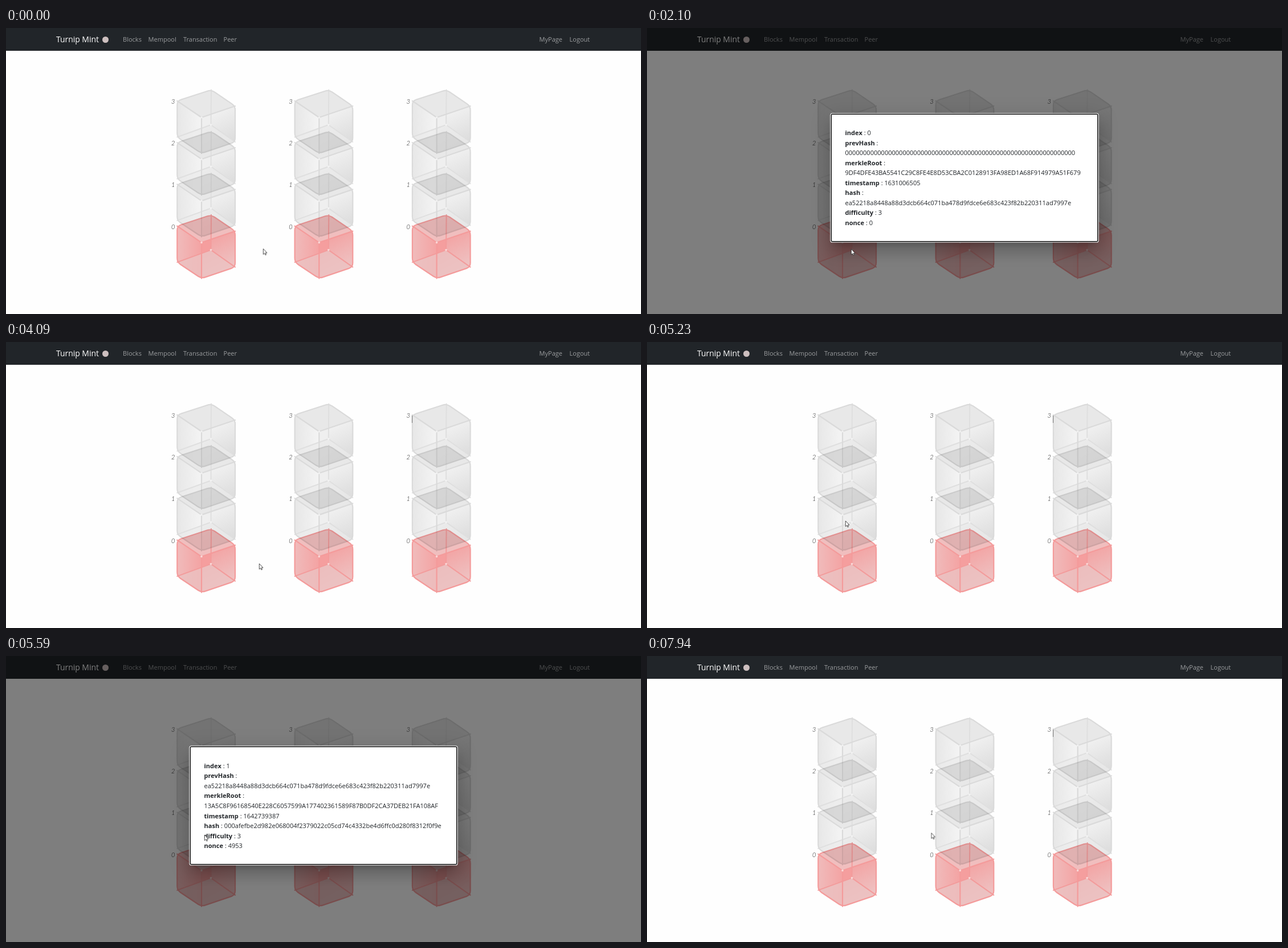
An HTML page that plays this animation: 1114x502 px, repeating every 8 s.

```html
<!DOCTYPE html>
<html lang="en">
<head>
<meta charset="utf-8">
<title>Block explorer</title>
<style>
html, body { margin: 0; width: 100%; height: 100%; overflow: hidden; background: #fefefe; }
body { font: 11.04px/17.55px "Open Sans", "Noto Sans", sans-serif; color: #212529; }
#stage { position: absolute; inset: 0 auto auto 0; width: 1114px; height: 502px; overflow: hidden; background: #fefefe; }
#stage > * { position: absolute; }

nav { left: 0; top: 0; width: 100%; height: 40px; background: #212529; color: #9b9d9f; }
nav span { position: absolute; top: 11px; white-space: nowrap; }
nav .brand { left: 88px; font-size: 13.9px; color: #fff; }
nav i { position: absolute; left: 169px; top: 14.5px; width: 11px; height: 11px; border-radius: 50%; background: #cdbfbf; }

svg { left: 0; top: 0; }
#stacks text { font: italic 300 11px Lato, "Open Sans", sans-serif; fill: #222; }

.caret { width: 1px; opacity: 0; animation: 8s step-end infinite; }
#caretA { left: 295px; top: 340px; height: 14px; background: #444; animation-name: caretA; }
#caretB { left: 712px; top: 129px; height: 13px; background: #777; animation-name: caretB; }

#dim { inset: 0; background: #000; opacity: 0; animation: dim 8s step-end infinite; }

.modal {
  left: 323px; width: 468px; box-sizing: border-box; padding: 23.5px;
  border: 1px solid #000; border-radius: 2px; background: #fff; white-space: nowrap; opacity: 0;
  box-shadow: 0 0 0 .5px #222, 0 0 0 1.6px #fff,
    0 8px 11px -5px rgba(0,0,0,.2), 0 17.5px 28px 2px rgba(0,0,0,.14), 0 6.5px 34px 6px rgba(0,0,0,.12);
  animation: 8s step-end infinite;
}
#genesis { top: 150.5px; animation-name: genesis; }
#second { top: 159.3px; animation-name: second; }

#cursor { overflow: visible; animation: cursor 8s ease-in-out infinite; }

@keyframes caretA {
  0% { opacity: 0 } .87% { opacity: 1 } 6.74% { opacity: 0 }
  13.36% { opacity: 1 } 20% { opacity: 0 }
}
@keyframes caretB {
  0% { opacity: 0 } 49.48% { opacity: 1 } 57% { opacity: 0 }
  63.6% { opacity: 1 } 67.2% { opacity: 0 } 93.23% { opacity: 1 }
  100% { opacity: 1 }
}
@keyframes dim {
  0% { opacity: 0 }
  23.6% { opacity: .03 } 24.6% { opacity: .39 } 25.48% { opacity: .49 } 26.23% { opacity: .5 }
  49.48% { opacity: 0 }
  67.23% { opacity: .17 } 68.1% { opacity: .44 } 69% { opacity: .497 } 69.85% { opacity: .5 }
  93.23% { opacity: 0 }
}
@keyframes genesis { 0% { opacity: 0 } 23.6% { opacity: 1 } 49.48% { opacity: 0 } }
@keyframes second { 0% { opacity: 0 } 67.23% { opacity: 1 } 93.23% { opacity: 0 } }
@keyframes cursor {
  0%, 15.5% { transform: translate(451px, 387.5px) }
  21.5%, 41% { transform: translate(358px, 388px) }
  43.75%, 54% { transform: translate(444px, 389px) }
  58.5%, 61.8% { transform: translate(347px, 328px) }
  64.6%, 86% { transform: translate(348px, 314px) }
  90.5%, 93.5% { transform: translate(267px, 304px) }
  99.2%, 100% { transform: translate(498.5px, 310.5px) }
}
</style>
</head>
<body>
<div id="stage">
  <nav>
    <span class="brand">Turnip Mint</span><i></i>
    <span style="left:205px">Blocks</span>
    <span style="left:249.5px">Mempool</span>
    <span style="left:311px">Transaction</span>
    <span style="left:381.5px">Peer</span>
    <span style="left:935.5px">MyPage</span>
    <span style="left:988.5px">Logout</span>
  </nav>

  <svg id="stacks" width="1114" height="502">
    <defs>
      <filter id="soft" x="-5%" y="-5%" width="110%" height="110%"><feGaussianBlur stdDeviation=".7"/></filter>
    </defs>
  </svg>

  <div class="caret" id="caretA"></div>
  <div class="caret" id="caretB"></div>
  <div id="dim"></div>

  <div class="modal" id="genesis">
    <b>index</b> : 0<br>
    <b>prevHash</b> :<br>
    0000000000000000000000000000000000000000000000000000000000000000<br>
    <b>merkleRoot</b> :<br>
    9DF4DFE43BA5541C29C8FE4E8D53CBA2C0128913FA98ED1A68F914979A51F679<br>
    <b>timestamp</b> : 1631006505<br>
    <b>hash</b> :<br>
    ea52218a8448a88d3dcb664c071ba478d9fdce6e683c423f82b220311ad7997e<br>
    <b>difficulty</b> : 3<br>
    <b>nonce</b> : 0
  </div>
  <div class="modal" id="second">
    <b>index</b> : 1<br>
    <b>prevHash</b> :<br>
    ea52218a8448a88d3dcb664c071ba478d9fdce6e683c423f82b220311ad7997e<br>
    <b>merkleRoot</b> :<br>
    13A5C8F96168540E228C6057599A177402361589F87B0DF2CA37DEB21FA108AF<br>
    <b>timestamp</b> : 1642739387<br>
    <b>hash</b> : 000afefbe2d982e068004f2379022c05cd74c4332be4d6ffc0d280f8312f0f9e<br>
    <b>difficulty</b> : 3<br>
    <b>nonce</b> : 4953
  </div>

  <svg id="cursor" width="10" height="14">
    <path d="M.3 0V9.9L2.6 7.8L4 11L5.5 10.3L4.1 7.2H7Z" fill="#fff" stroke="#222" stroke-width=".8" stroke-linejoin="round"/>
  </svg>
</div>

<script>
// Cube corners: top/left/right/front of the lid, then the same four of the base
const T = [60, .5], L = [.3, 20], R = [102, 29], F = [43, 49];
const BT = [59.5, 62], BL = [.3, 83.5], BR = [102, 92], BF = [43, 112];
// Where the front edges cross the back ones
const lidCross = [59.8, 43.3], baseCross = [43, 68];

const themes = {
  grey: { top: '#e9e9e9', left: ['#e8e8e8', '#f5f5f5'], right: ['#f8f8f8', '#dcdcdc'],
          base: '#ededed', baseAlpha: .7, core: '#f0f0f0', edge: '#dbdbdb', inner: '#e0e0e0' },
  red: { top: '#f1bfbf', left: ['#f1bcbc', '#f5a4a4'], right: ['#f59c9c', '#efc6c6'],
         base: '#edc3c3', baseAlpha: .8, core: '#f69f9f', edge: '#f59c9c', inner: '#f49c9c' }
};

const poly = (...pts) => 'M' + pts.map(p => p.join(' ')).join('L');

function rounded(pts, r) {
  const toward = (a, b) => {
    const k = r / Math.hypot(b[0] - a[0], b[1] - a[1]);
    return [a[0] + (b[0] - a[0]) * k, a[1] + (b[1] - a[1]) * k];
  };
  return pts.map((p, i) => {
    const before = toward(p, pts.at(i - 1)), after = toward(p, pts[(i + 1) % pts.length]);
    return `${i ? 'L' : 'M'}${before}Q${p} ${after}`;
  }).join('') + 'Z';
}

const gradient = (id, [from, to], x2, y2) =>
  `<linearGradient id="${id}" x1="0" y1="0" x2="${x2}" y2="${y2}">
    <stop stop-color="${from}"/><stop offset="1" stop-color="${to}"/></linearGradient>`;

function cube(name, c) {
  const hull = rounded([T, R, BR, BF, BL, L], 7);
  const dot = ([x, y]) => `<circle cx="${x}" cy="${y}" r="1.8" fill="#fff" opacity=".6"/>`;
  return gradient(name + 'L', c.left, 1, 0) + gradient(name + 'R', c.right, .35, 1) +
    `<clipPath id="${name}Clip"><path d="${hull}"/></clipPath>
    <g id="${name}">
      <g clip-path="url(#${name}Clip)">
        <path d="${poly(T, R, F, L)}" fill="${c.top}"/>
        <path d="${poly(L, F, BF, BL)}" fill="url(#${name}L)"/>
        <path d="${poly(F, R, BR, BF)}" fill="url(#${name}R)"/>
        <path d="${poly(BT, BR, BF, BL)}" fill="${c.base}" opacity="${c.baseAlpha}"/>
        <path d="${rounded([F, lidCross, BT, baseCross], 4)}" fill="${c.core}"/>
      </g>
      <g fill="none" stroke-linejoin="round" stroke-linecap="round" filter="url(#soft)">
        <path d="${poly(BL, BT, BR)}${poly(T, BT)}" stroke="${c.inner}" stroke-width="2"/>
        <path d="${poly(L, F, R)}${poly(F, BF)}" stroke="${c.edge}" stroke-width="2.2"/>
        <path d="${hull}" stroke="${c.edge}" stroke-width="2.2"/>
        ${dot(F)}${dot(BT)}
      </g>
    </g>`;
}

const stacks = document.getElementById('stacks');
let defs = '', body = '';
for (const name in themes) defs += cube(name, themes[name]);
for (let col = 0; col < 3; col++) {
  for (let level = 0; level < 4; level++) {
    const x = 300 + col * 206.3, y = 327.6 - level * 73.2;
    body += `<use href="#${level ? 'grey' : 'red'}" x="${x}" y="${y}" style="mix-blend-mode:multiply"/>
      <text x="${x - 10}" y="${y + 25}">${level}</text>`;
  }
}
stacks.querySelector('defs').innerHTML += defs;
stacks.insertAdjacentHTML('beforeend', body);
</script>
</body>
</html>
```
